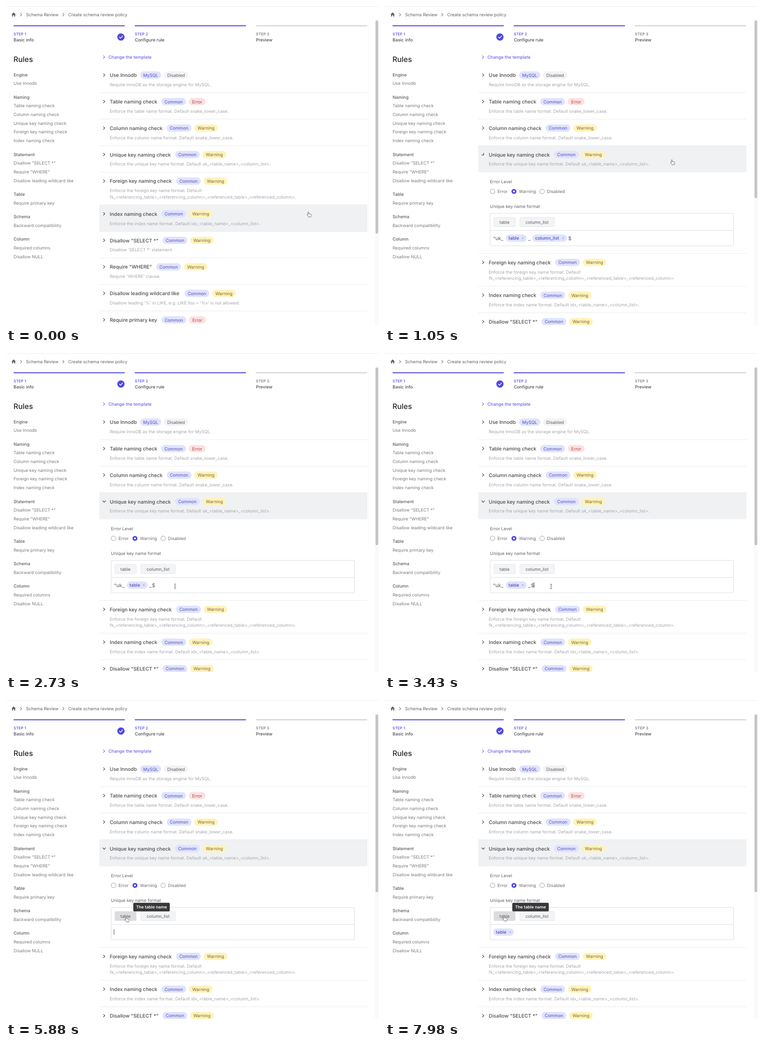
An HTML page for the animation above (8000 ms loop, 800 px wide and 684 px high).

```html
<!DOCTYPE html>
<html lang="en">
<head>
<meta charset="utf-8">
<title>Schema review policy</title>
<style>
  html, body { margin: 0; width: 100%; height: 100%; overflow: hidden; background: #fff; }
  svg {
    display: block; width: 800px; height: 684px;
    font-family: Inter, "Open Sans", sans-serif; text-rendering: geometricPrecision;
  }
</style>
</head>
<body>
<svg id="stage" viewBox="0 0 800 684"></svg>
<script>
const LOOP = 8000;
const SMALL = 9.31, LARGE = 10.65;
const INK = '#4b4b51', BODY = '#7b7b82', MUTED = '#a6a6ad', INDIGO = '#4f48e0';
const stage = document.getElementById('stage');

function add(parent, tag, attrs = {}) {
  const el = document.createElementNS('http://www.w3.org/2000/svg', tag);
  for (const key in attrs) el.setAttribute(key, attrs[key]);
  parent.appendChild(el);
  return el;
}
const group = (parent, x = 0, y = 0) => add(parent, 'g', { transform: `translate(${x} ${y})` });
const rect = (parent, x, y, width, height, fill, rx = 0, more = {}) =>
  add(parent, 'rect', { x, y, width, height, fill, rx, ...more });
const line = (parent, x1, x2, y, stroke, width = 1) =>
  add(parent, 'path', { d: `M${x1} ${y}H${x2}`, stroke, 'stroke-width': width });

// y is the middle of the capital letters
function text(parent, x, y, value, fill = BODY, size = SMALL, weight = 400, more = {}) {
  const el = add(parent, 'text', { x, y: y + size * 0.364, fill, 'font-size': size, 'font-weight': weight, ...more });
  el.textContent = value;
  return el;
}
const centred = { 'text-anchor': 'middle' };

function chevron(parent, x, y, stroke = INK, width = 1.25) {
  return add(group(parent, x, y), 'path', {
    d: 'M-1.5 -2.9L1.5 0L-1.5 2.9', fill: 'none', stroke, 'stroke-width': width,
    'stroke-linecap': 'round', 'stroke-linejoin': 'round'
  });
}
const show = (el, on) => el.setAttribute('visibility', on ? 'visible' : 'hidden');

// Header
rect(stage, 0, 0, 800, 1, '#ececee');
add(stage, 'path', { d: 'M16.4 13.7L21 18.3H19.8V22.6H17.6V19.6H15.2V22.6H13V18.3H11.8Z', fill: '#606066' });
chevron(stage, 32.3, 18.6, '#77777e', 1.1);
text(stage, 43, 18.8, 'Schema Review', '#636369');
chevron(stage, 123, 18.6, '#77777e', 1.1);
text(stage, 133.6, 18.8, 'Create schema review policy', '#636369');

['Basic info', 'Configure rule', 'Preview'].forEach((label, i) => {
  const x = 16.3 + i * 259.9;
  const reached = i < 2;
  line(stage, x, x + 238.4, 42.4, reached ? '#5a53e2' : '#d2d2d6', 2.3);
  text(stage, x, 60, `STEP ${i + 1}`, reached ? '#625be4' : BODY, 7.98, 600, { 'letter-spacing': 0.2 });
  text(stage, x, 72.4, label, INK, SMALL, 500);
});
add(stage, 'circle', { cx: 246.5, cy: 66.5, r: 7.8, fill: INDIGO });
add(stage, 'path', {
  d: 'M243.2 66.8L245.6 69.1L250 64.3', fill: 'none', stroke: '#fff', 'stroke-width': 1.5,
  'stroke-linecap': 'round', 'stroke-linejoin': 'round'
});

// Sidebar
text(stage, 16, 114, 'Rules', '#26262a', 15.9, 500);
const sidebar = {
  Engine: ['Use Innodb'],
  Naming: ['Table naming check', 'Column naming check', 'Unique key naming check',
    'Foreign key naming check', 'Index naming check'],
  Statement: ['Disallow "SELECT *"', 'Require "WHERE"', 'Disallow leading wildcard like'],
  Table: ['Require primary key'],
  Schema: ['Backward compatibility'],
  Column: ['Required columns', 'Disallow NULL']
};
let sideY = 147.2;
for (const [heading, items] of Object.entries(sidebar)) {
  text(stage, 16.2, sideY, heading, '#5c5c63', SMALL, 500);
  for (const item of items) text(stage, 16.2, sideY += 18.7, item);
  sideY += 29.4;
}

// Rule list
chevron(stage, 210.3, 109.6, '#6a64e8', 1.1);
text(stage, 219.8, 109.8, 'Change the template', '#6a64e8', SMALL, 500);

const badges = {
  MySQL: [45.3, '#dfe3fe', '#534db5'],
  Common: [53, '#dfe3fe', '#534db5'],
  Warning: [50.7, '#fdf4b9', '#84603a'],
  Error: [36, '#fde1e2', '#ad4648'],
  Disabled: [51.5, '#f2f3f4', '#5e5e64']
};
function badge(parent, x, y, kind) {
  const [width, fill, ink] = badges[kind];
  rect(parent, x, y - 7.8, width, 15.6, fill, 7.8);
  text(parent, x + width / 2, y + 0.2, kind, ink, SMALL, 400, centred);
  return x + width + 6;
}

const rules = [
  ['Use Innodb', 287.7, 'MySQL', 'Disabled', 'Require InnoDB as the storage engine for MySQL.'],
  ['Table naming check', 333, 'Common', 'Error', 'Enforce the table name format. Default snake_lower_case.'],
  ['Column naming check', 344.7, 'Common', 'Warning', 'Enforce the column name format. Default snake_lower_case.'],
  ['Unique key naming check', 362.5, 'Common', 'Warning', 'Enforce the unique key name format. Default uk_<table_name>_<column_list>.'],
  ['Foreign key naming check', 365, 'Common', 'Warning', 'Enforce the foreign key name format. Default',
    'fk_<referencing_table>_<referencing_column>_<referenced_table>_<referenced_column>.'],
  ['Index naming check', 333.3, 'Common', 'Warning', 'Enforce the index name format. Default idx_<table_name>_<column_list>.'],
  ['Disallow "SELECT *"', 335.8, 'Common', 'Warning', "Disallow 'SELECT *' statement."],
  ['Require "WHERE"', 322.3, 'Common', 'Warning', "Require 'WHERE' clause."],
  ['Disallow leading wildcard like', 383, 'Common', 'Warning', "Disallow leading '%' in LIKE, e.g. LIKE foo = '%x' is not allowed."],
  ['Require primary key', 333.5, 'Common', 'Error', '']
];
const UNIQUE = 3, EXPANSION = 174.4;
const list = group(stage), lower = group(stage);
let rowTop = 128.8;
const rows = rules.map(([title, badgeX, scope, level, ...description], i) => {
  const height = 56.83 + (description.length - 1) * 13.4;
  const row = group(i > UNIQUE ? lower : list, 0, rowTop);
  const hover = rect(row, 200, 0.4, 575, height, '#f0f1f3');
  if (i) line(row, 200, 775, 0.2, '#ebebee');
  const arrow = chevron(row, 210.5, 19.2);
  text(row, 222.5, 19.5, title, INK, LARGE, 500);
  badge(row, badge(row, badgeX, 19.3, scope), 19.3, level);
  description.forEach((part, k) => text(row, 222.5, 39.8 + k * 13.4, part, MUTED));
  rowTop += height;
  return { hover, arrow, top: rowTop - height, bottom: rowTop };
});

// Expanded settings
const panel = group(stage);
text(panel, 225, 376.6, 'Error Level', '#636369');
[['Error', 230.6], ['Warning', 276.6], ['Disabled', 337]].forEach(([label, cx], i) => {
  const on = i === 1;
  add(panel, 'circle', {
    cx, cy: 397.5, r: on ? 3.7 : 5, fill: '#fff',
    stroke: on ? INDIGO : '#909097', 'stroke-width': on ? 3.3 : 0.9
  });
  text(panel, cx + 10.6, 397.8, label, '#6c6c73');
});
text(panel, 225, 430, 'Unique key name format', '#636369');
rect(panel, 225.5, 444.8, 522, 69.4, '#fff', 1.5, { stroke: '#dcdde1' });
line(panel, 225.5, 747.5, 481.3, '#dcdde1');
function chip(x, width, label) {
  const box = rect(panel, x, 453.3, width, 20, '#f3f4f5', 2, { stroke: '#e2e3e6', 'stroke-width': 0.8 });
  text(panel, x + width / 2, 463.3, label, '#5c5c63', SMALL, 400, centred);
  return box;
}
const tableChip = chip(233.4, 46, 'table');
chip(289.2, 74, 'column_list');

// Format field
function tag(label, width) {
  const g = group(panel);
  rect(g, 0, 489.8, width, 15.8, '#dfe3fe', 7.9);
  text(g, 5.6, 497.9, label, '#534db5', 9.5, 500);
  const x = width - 7.9;
  add(g, 'path', { d: `M${x - 1.7} 496l3.4 3.4m0 -3.4l-3.4 3.4`, stroke: '#8583c9', 'stroke-width': 0.8 });
  return g;
}
const prefix = text(panel, 231.8, 498, '', '#57575d', LARGE);
const underscore = text(panel, 307, 498, '_', '#57575d', LARGE);
const dollar = text(panel, 393, 498, '$', '#57575d', LARGE);
const tableTag = tag('table', 44.2), columnTag = tag('column_list', 73.7);
columnTag.setAttribute('transform', 'translate(316.3 0)');
const caret = rect(panel, 0, 491.5, 0.9, 12, '#333338');

const tooltip = group(panel);
rect(tooltip, 273, 434.8, 78.3, 18.4, '#38383b', 2.5);
text(tooltip, 312.1, 444.2, 'The table name', '#fff', 8.9, 600, centred);

rect(stage, 791, 28, 9, 656, '#fafafa');
const scrollbar = rect(stage, 792.6, 31, 5.6, 381, '#c3c3c5', 2.8);

// Pointers
const pointer = group(stage);
const shapes = {
  hand: add(pointer, 'path', {
    d: 'M-2.5 0.8V-4.2Q-2.5 -5.4 -1.5 -5.4T-0.5 -4.2V-1.2Q0.4 -2 1.3 -1Q2.3 -1.7 3 -0.6Q4.9 -1 4.9 0.8V2.2Q4.9 3.6 4 4.3V5.4H-1.3V4.5Q-2.8 3 -4.5 0.9Q-4.8 -0.5 -2.5 0.8Z',
    fill: '#fff', stroke: '#6a6a70', 'stroke-width': 1
  }),
  arrow: add(pointer, 'path', {
    d: 'M-1.8 -4.8V4L0.2 2.2L1.6 5.2L3 4.5L1.7 1.7H4.3Z',
    fill: '#151518', stroke: '#fff', 'stroke-width': 0.7
  }),
  beam: add(pointer, 'path', {
    d: 'M-2 -4.8Q0 -4.8 0 -3.6Q0 -4.8 2 -4.8M0 -3.6V3.8M-2 5Q0 5 0 3.8Q0 5 2 5',
    fill: 'none', stroke: '#4a4a4f', 'stroke-width': 0.9
  })
};

// Pointer stops: time, x, y
const stops = [
  [0, 650, 447], [80, 650, 447], [840, 616.7, 335], [1220, 616.7, 335], [1980, 380, 498],
  [2400, 380, 498], [2900, 356.3, 500.5], [5250, 356.3, 500.5], [5620, 259, 470.5],
  [6150, 259, 470.5], [6450, 257, 468.5], [LOOP, 257, 468.5]
];
const EXPAND = 970, REMOVE = 2280, FOCUS = 2950, DELETE = 3500, KEY = 62, REAPPEAR = 5250, INSERT = 6930;
const caretStops = [319.3, 313, 306, 257, 250, 244, 238, 231.2];
const clamp = v => Math.max(0, Math.min(1, v));

function pointerAt(t) {
  const i = stops.findIndex((s, k) => k && t <= s[0]);
  const [t0, x0, y0] = stops[i - 1], [t1, x1, y1] = stops[i];
  const p = (t - t0) / (t1 - t0), e = p * p * (3 - 2 * p);
  return [x0 + (x1 - x0) * e, y0 + (y1 - y0) * e];
}

function pointerShape(t, x, y, open) {
  if (!open || y < 356) return 'hand';
  if (y < 474 && y > 453 && x > 233 && x < 280) return 'hand';
  if (t > REMOVE && y > 481 && x < 377) return 'beam';
  return 'arrow';
}

function drawField(t) {
  const deleted = t < DELETE ? 0 : Math.min(7, 1 + Math.floor((t - DELETE) / KEY));
  const inserted = t >= INSERT;
  prefix.textContent = '^uk_'.slice(0, Math.min(4, 7 - deleted));
  show(underscore, deleted < 2);
  show(dollar, deleted < 1);
  dollar.setAttribute('x', t < REMOVE ? 393 : 313);
  show(columnTag, t < REMOVE);
  show(tableTag, deleted < 3 || inserted);
  tableTag.setAttribute('transform', `translate(${inserted ? 232.2 : 259.4} 0)`);

  const lastKey = DELETE + 6 * KEY;
  const blinkStart = t < DELETE ? FOCUS : lastKey;
  const lit = t < lastKey && t >= DELETE || Math.floor((t - blinkStart) / 500) % 2 === 0;
  show(caret, t >= FOCUS && !inserted && lit);
  caret.setAttribute('x', caretStops[deleted]);
}

function render(t) {
  const open = t >= EXPAND;
  const [x, y] = pointerAt(t);
  rows.forEach((row, i) => show(row.hover, open ? i === UNIQUE : y > row.top && y <= row.bottom));
  rows[UNIQUE].arrow.setAttribute('transform', `rotate(${90 * clamp((t - EXPAND) / 150)})`);
  lower.setAttribute('transform', `translate(0 ${open ? EXPANSION : 0})`);
  panel.setAttribute('display', open ? 'inline' : 'none');
  scrollbar.setAttribute('height', open ? 381 : 457);
  drawField(t);

  const shape = pointerShape(t, x, y, open);
  const onChip = t > REAPPEAR && shape === 'hand';
  tableChip.setAttribute('fill', onChip ? '#dcdcdf' : '#f3f4f5');
  show(tooltip, onChip);
  pointer.setAttribute('transform', `translate(${x} ${y})`);
  const visible = t < DELETE || t >= REAPPEAR;
  for (const name in shapes) show(shapes[name], visible && name === shape);
}

const start = performance.now();
function tick() {
  render((performance.now() - start) % LOOP);
  requestAnimationFrame(tick);
}
tick();
</script>
</body>
</html>
```
